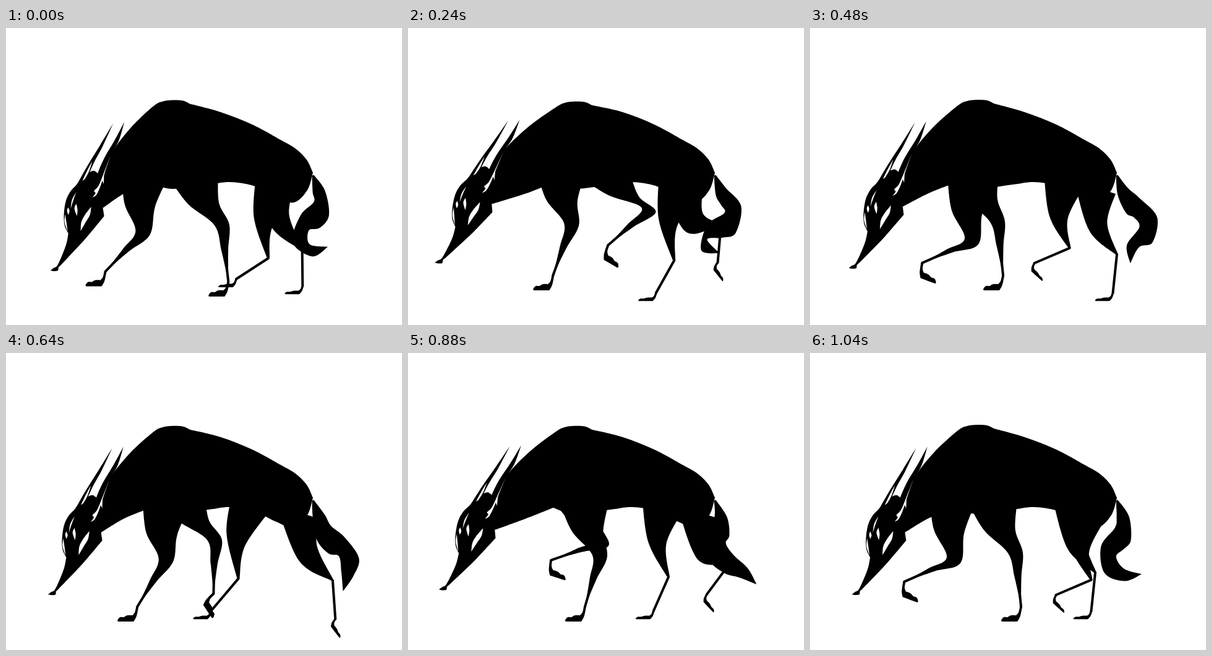
These frames come from a looping animation (640 by 480 pixels, 1120 ms). An HTML page with a canvas:

```html
<!DOCTYPE html>
<html lang="en">
<head>
<meta charset="utf-8">
<title>Prowling beast</title>
<style>
  html, body { margin: 0; width: 100%; height: 100%; overflow: hidden; background: #fff; }
  canvas { display: block; }
</style>
</head>
<body>
<canvas id="stage" width="640" height="480"></canvas>
<script>
const ctx = document.getElementById('stage').getContext('2d');
const STEPS = 14, STEP_MS = 80, HALF = STEPS / 2;
const rad = deg => deg * Math.PI / 180;
const wave = (step, peak, period = STEPS) => Math.cos(2 * Math.PI * (step - peak) / period);
const mix = (p, q, k = .5) => [p[0] + (q[0] - p[0]) * k, p[1] + (q[1] - p[1]) * k];
// Point at a distance from p; angle 0 points down, positive angles to the left.
const hang = (p, angle, length) => [p[0] - Math.sin(rad(angle)) * length, p[1] + Math.cos(rad(angle)) * length];

// Stride of the joint above the shin, every second step: x, y, shin angle.
const knees = [[250,341,44], [276,328,24], [310,328,16], [332,323,-6], [366,312,1], [389,294,49], [288,341,82]];
const hocks = [[424,372,57], [411,377,34], [456,373,23], [496,366,6], [528,368,-4], [541,328,5], [490,358,66]];

// Closed smooth motion through the keys.
function cycle(keys, step) {
  const n = keys.length, u = step / 2, i = Math.floor(u), k = u - i;
  const [a, b, c, d] = [-1, 0, 1, 2].map(o => keys[(i + o + n) % n]);
  return b.map((v, j) => v + .5 * k * (c[j] - a[j]
    + k * (2 * a[j] - 5 * v + 4 * c[j] - d[j] + k * (3 * v - a[j] - 3 * c[j] + d[j]))));
}

function points(flat) {
  const out = [];
  for (let j = 0; j < flat.length; j += 2) out.push([flat[j], flat[j + 1]]);
  return out;
}

// Smooth curve through the points, joined to the current path.
function spline(pts) {
  ctx.lineTo(...pts[0]);
  for (let j = 0; j < pts.length - 1; j++) {
    const p = pts[j], q = pts[j + 1], before = pts[j - 1] || p, after = pts[j + 2] || q;
    ctx.bezierCurveTo(
      p[0] + (q[0] - before[0]) / 6, p[1] + (q[1] - before[1]) / 6,
      q[0] - (after[0] - p[0]) / 6, q[1] - (after[1] - p[1]) / 6, ...q);
  }
}

// Fills a shape whose sides are smooth and whose corners between sides are sharp.
function fill(color, ...sides) {
  ctx.fillStyle = color;
  ctx.beginPath();
  sides.forEach(spline);
  ctx.fill();
}
const shape = (color, ...sides) => fill(color, ...sides.map(points));

function bone(p, q) {
  ctx.lineWidth = 4;
  ctx.beginPath();
  ctx.moveTo(...p);
  ctx.lineTo(...q);
  ctx.stroke();
}

// A lifted paw curls backwards, so it is mirrored and turned.
function paw([x, y], flat, toe, w, h) {
  ctx.save();
  ctx.translate(x, y);
  if (!flat) ctx.rotate(rad(toe - 38));
  ctx.scale(flat ? w : -w, h);
  shape('#000', [-2,0, -4,9, -8,14], [-8,14, -16,14, -22,17], [-22,17, -28,17, -32,22, -31,24],
    [-31,24, -6,24], [-6,24, -2,17, 0,10, 2,0]);
  ctx.restore();
}

// Shin and paw; returns the ankle. The paw stays on the ground for half of the stride.
function shin(step, joint, angle, length, ground) {
  const ankle = hang(joint, angle, length);
  if (step >= 1 && step <= HALF) ankle[1] = ground;
  bone(joint, ankle);
  return ankle;
}

function foreleg(step) {
  const [x, y, angle] = cycle(knees, step), knee = [x, y];
  const ankle = shin(step, knee, angle, 87, 410);
  const shoulder = 285 + (x - 310) / 2, turn = rad(angle * .35);
  const side = (sign, width) => [Math.cos(turn) * width * sign, Math.sin(turn) * width * sign];
  const off = (p, d) => [p[0] + d[0], p[1] + d[1]];
  const edge = sign => {
    const root = [shoulder + 38 * sign, 247], bend = off(knee, side(sign, 12));
    const mid = off(mix(root, bend), [-7, 2]);
    return [root, mid, bend, off(mix(knee, ankle, .45), side(sign, 5.5)), ankle];
  };
  fill('#000', edge(-1), edge(1).reverse());
  paw(ankle, step <= HALF, 95 - .55 * angle, 1, 1);
}

function hindleg(step) {
  const [x, y, angle] = cycle(hocks, step), hock = [x, y], reach = x - 424;
  const ankle = shin(step, hock, angle, 62, 428);
  fill('#000',
    [[403 + reach * .33, 246], [401 + reach * .7, 308 + reach * .27], [x - 2, y]],
    [[x + 2, y], [430 + reach * .7, 323 - reach * .1], [465 + reach * .4, 268]]);
  paw(ankle, step <= HALF, 90 - .15 * angle, .9, .55);
}

// The far leg is half a stride apart and drawn a little forward and up.
function pair(leg, step, dx, dy) {
  leg(step % STEPS);
  ctx.save();
  ctx.translate(dx, dy);
  leg((step + HALF) % STEPS);
  ctx.restore();
}

// A bending wave runs from the root of the tail to its tip.
function tail(step) {
  const rest = [20, 18, 5, -3, 3, 42], left = [], right = [];
  let p = [496, 238];
  rest.forEach((angle, i) => {
    const bend = angle + Math.min(23 * i, 60) * wave(step, 2 + 2.45 * i);
    const width = 1.5 + 17 * Math.sin(Math.PI * i / rest.length);
    left.push(hang(p, 90 - bend, width));
    right.push(hang(p, -90 - bend, width));
    p = hang(p, -bend, 28);
  });
  fill('#000', [...right, p], [p, ...left.reverse()]);
}

// Nose position and tilt: two nods per loop.
function headPose(step) {
  const x = 59 + 13 * wave(step, .1, HALF) + 4 * wave(step, 11);
  return [x, 380 + (x - 46) * .45, (72 - x) * .15];
}

function body(step, [noseX, noseY, tilt]) {
  const bob = .5 + 1.5 * wave(step, 2.5, HALF), c = Math.cos(rad(tilt)), s = Math.sin(rad(tilt));
  const onHead = (x, y) => [noseX + (x - 64) * c - (y - 391) * s, noseY + (x - 64) * s + (y - 391) * c];
  const nape = onHead(161, 203), ridge = mix(nape, [238, 127 + bob]);
  shape('#000',
    [...onHead(150, 234), ...nape, ridge[0] - 3, ridge[1] - 3, 238,127 + bob,
      254,119 + bob, 270,117 + bob, 286,118 + bob, 297,123 + bob],
    [297,123 + bob, 347,136, 398,156, 446,182],
    [446,182, 468,195, 486,213, 496,234],
    [496,234, 487,262, 465,282, 435,272, 400,255, 362,249, 328,253, 268,260, 235,250],
    [235,250, 192,267, ...onHead(148, 290)]);
}

// Drawn around the nose at 64, 391.
function head([x, y, tilt]) {
  ctx.save();
  ctx.translate(x, y);
  ctx.rotate(rad(tilt));
  ctx.translate(-64, -391);
  // skull and snout
  shape('#000',
    [63,391, 68,387, 74,383, 82,366, 89,347, 92,331],
    [92,331, 86,318, 85,300, 88,279, 95,264, 104,254],
    [104,254, 115,241, 125,233, 134,230, 142,236],
    [142,236, 152,260, 148,290],
    [148,290, 150,303],
    [150,303, 121,338, 96,365, 79,383],
    [79,383, 76,386, 75,391, 68,392]);
  // horns
  shape('#000', [104,256, 123,222, 144,188, 165,153], [165,153, 148,190, 134,216, 123,241]);
  shape('#000', [131,264, 139,236, 150,210, 167,181, 183,151], [183,151, 174,181, 161,205, 150,234, 135,272]);
  // openings in the mane and the mask
  shape('#fff', [115,246, 122,231, 131,214], [131,214, 126,230, 119,243]);
  shape('#fff', [161,204, 149,235, 141,254, 134,262, 136,266, 131,273],
    [131,273, 138,268, 145,252, 152,230, 161,204]);
  shape('#fff', [112,327, 113,313, 119,301, 129,288], [129,288, 127,301, 120,313, 112,327]);
  shape('#fff', [92,289, 90,294, 92,301], [92,301, 94,295, 92,289]);
  shape('#fff', [105,283, 102,291, 106,303], [106,303, 107,293, 105,283]);
  shape('#fff', [87,300, 86,313, 91,328], [91,328, 89,313, 87,300]);
  shape('#fff', [105,264, 98,277, 96,291], [96,291, 100,278, 105,264]);
  ctx.restore();
}

function draw(now) {
  const step = Math.floor(now / STEP_MS) % STEPS, pose = headPose(step);
  ctx.fillStyle = '#fff';
  ctx.fillRect(0, 0, 640, 480);
  ctx.strokeStyle = '#000';
  ctx.lineCap = 'round';
  body(step, pose);
  pair(hindleg, step, -35, -11);
  pair(foreleg, step + HALF, -29, -10);
  tail(step);
  head(pose);
  requestAnimationFrame(draw);
}
requestAnimationFrame(draw);
</script>
</body>
</html>
```
